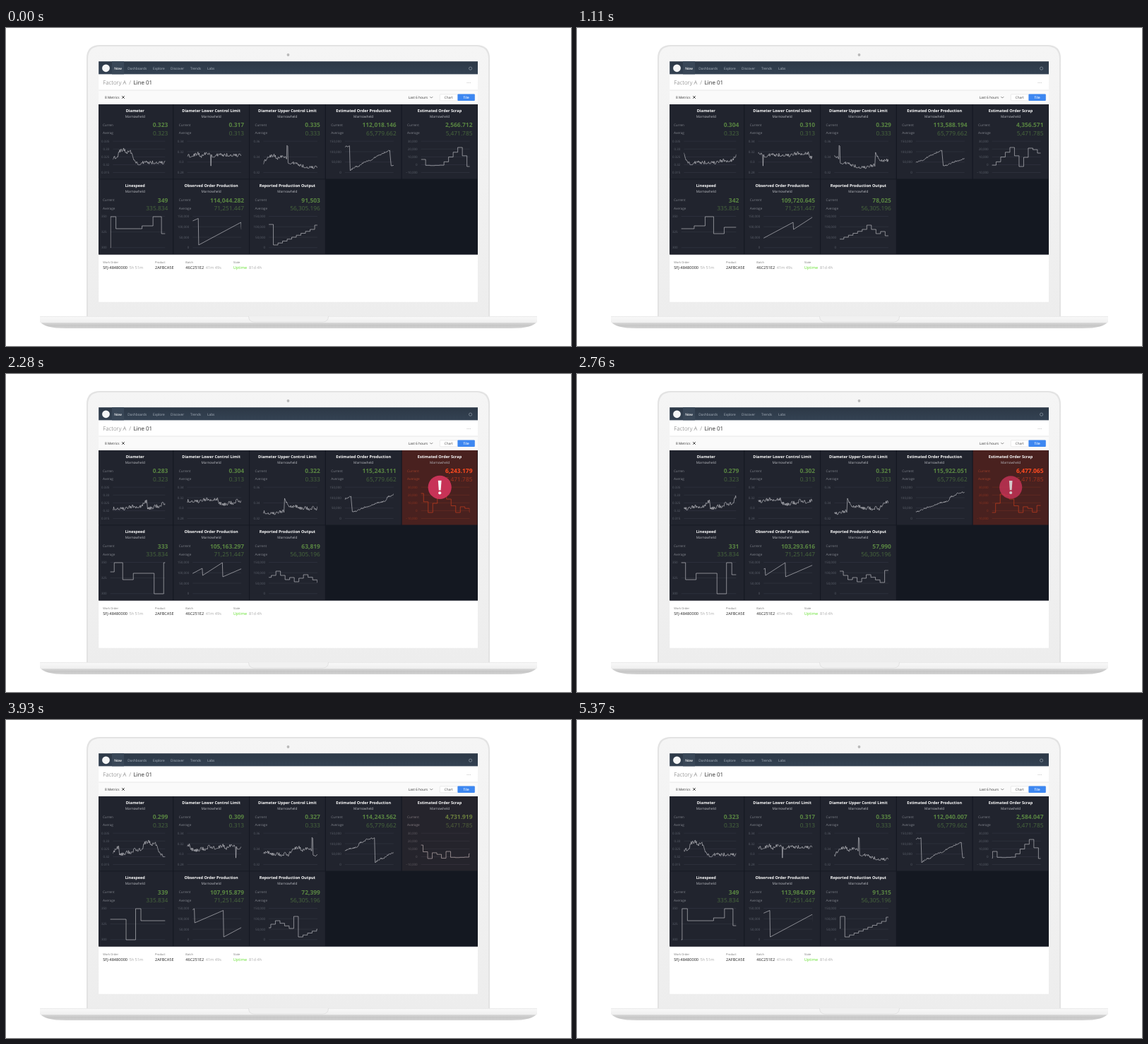
An HTML page for the animation above (5.4 s loop, 800 by 450 pixels).

```html
<!DOCTYPE html>
<html lang="en">
<head>
<meta charset="utf-8">
<title>Factory dashboard</title>
<style>
  html, body { margin: 0; width: 100%; height: 100%; overflow: hidden; background: #fff; }
  svg { display: block; }
  text { font-family: "Open Sans", "Noto Sans", sans-serif; text-rendering: geometricPrecision; }
  .tile { --a: 0%; }
  .tile * { --mix: color-mix(in srgb, var(--hot) var(--a), var(--cool)); }
  .bg { --cool: #21242e; --hot: #49211f; fill: var(--mix); }
  .title { font-size: 5.57px; font-weight: 700; fill: #fff; text-anchor: middle; }
  .sub { font-size: 4.8px; fill: #b9bbc1; text-anchor: middle; }
  .label { --cool: #80848c; --hot: #a0402a; font-size: 4.7px; fill: var(--mix); }
  .now { --cool: #598542; --hot: #ff4b20; font-size: 8.45px; font-weight: 700; fill: var(--mix); text-anchor: end; }
  .avg { --cool: #48683d; --hot: #a3351f; font-size: 8.4px; fill: var(--mix); text-anchor: end; }
  .tick { --cool: #5c616b; --hot: #8a3422; font-size: 4.5px; fill: var(--mix); text-anchor: end; }
  .grid { --cool: #343844; --hot: #6c2e23; stroke: var(--mix); stroke-width: .6; }
  .line { --cool: #d0d1d5; --hot: #d8421f; stroke: var(--mix); stroke-width: .6; fill: none; stroke-linejoin: round; }
  .nav { font-size: 4.8px; fill: #a9b2bd; }
  .crumb { font-size: 8px; fill: #666; font-weight: 300; }
  .head { font-size: 4px; fill: #777; }
  .info { font-size: 5.6px; fill: #222; }
  .dim { fill: #aaa; }
</style>
</head>
<body>
<svg width="800" height="450" viewBox="0 0 800 450">
  <defs>
    <linearGradient id="lid" x1="0" y1="0" x2="0" y2="1">
      <stop offset="0" stop-color="#f5f5f5"/><stop offset="1" stop-color="#ededed"/>
    </linearGradient>
    <linearGradient id="base" x1="0" y1="0" x2="0" y2="1">
      <stop offset="0" stop-color="#f9f9f9"/><stop offset="1" stop-color="#efefef"/>
    </linearGradient>
    <linearGradient id="under" x1="0" y1="0" x2="0" y2="1">
      <stop offset="0" stop-color="#e2e2e2"/><stop offset=".6" stop-color="#c6c6c6"/><stop offset="1" stop-color="#d4d4d4"/>
    </linearGradient>
    <linearGradient id="bar" x1="0" y1="0" x2="0" y2="1">
      <stop offset="0" stop-color="#2c3846"/><stop offset="1" stop-color="#344253"/>
    </linearGradient>
  </defs>

  <path d="M114 409V43Q114 24 133 24H666Q685 24 685 43V409Z" fill="#e3e3e3"/>
  <path d="M116 409V44Q116 26 134 26H665Q683 26 683 44V409Z" fill="url(#lid)"/>
  <circle cx="399.5" cy="38" r="1.9" fill="#b9b9b9"/>
  <path d="M48 415H752Q747 425 715 425H85Q53 425 48 415Z" fill="url(#under)"/>
  <rect x="48" y="408" width="704" height="9" rx="1" fill="url(#base)"/>
  <path d="M48 408.3H752" stroke="#e2e2e2" stroke-width=".7"/>
  <path d="M343.5 408Q344 416 351 416H449Q456 416 456.5 408" fill="#f1f1f1" stroke="#dedede" stroke-width=".8"/>

  <svg x="131.2" y="47.2" width="536.8" height="340.6" viewBox="131.2 47.2 536.8 340.6">
    <rect x="131" y="47" width="538" height="341" fill="#fff"/>
    <rect x="131" y="47" width="538" height="18.4" fill="url(#bar)"/>
    <rect x="150" y="47" width="17" height="18.4" fill="#394757"/>
    <circle cx="141.5" cy="56.8" r="5.4" fill="#f4f5f6"/>
    <g class="nav">
      <text x="153.3" y="58.8" fill="#fff" font-weight="600">Now</text>
      <text x="172.3" y="58.8">Dashboards</text>
      <text x="208" y="58.8">Explore</text>
      <text x="233" y="58.8">Discover</text>
      <text x="261" y="58.8">Trends</text>
      <text x="285" y="58.8">Labs</text>
    </g>
    <circle cx="657.6" cy="57.2" r="2.1" fill="none" stroke="#84909c" stroke-width=".8"/>

    <g class="crumb">
      <text x="137.2" y="79.6">Factory A</text>
      <text x="174.2" y="79.6">/</text>
      <text x="180.4" y="79.6" font-weight="400" fill="#333">Line 01</text>
    </g>
    <path d="M652.5 77.5H658" stroke="#c4c4c4" stroke-width=".9" stroke-dasharray="1.2 1"/>

    <rect x="131" y="88" width="538" height="20" fill="#fafafa"/>
    <path d="M131 88H669" stroke="#e2e2e2" stroke-width=".8"/>
    <text x="140" y="99.8" font-size="4.8" fill="#333">8 Metrics</text>
    <path d="M164.2 96.2l3.6 3.6m0-3.6l-3.6 3.6" stroke="#333" stroke-width=".9"/>
    <text x="569.7" y="99.8" font-size="4.8" fill="#333">Last 6 hours</text>
    <path d="M600.4 97.2l1.9 1.9 1.9-1.9" fill="none" stroke="#555" stroke-width=".7"/>
    <rect x="614.3" y="93.8" width="49.4" height="9" rx="1" fill="#fff" stroke="#ddd" stroke-width=".6"/>
    <rect x="639.4" y="93.6" width="24.4" height="9.4" rx="1" fill="#3d87f1"/>
    <text x="626.7" y="99.8" font-size="4.7" fill="#444" text-anchor="middle">Chart</text>
    <text x="651.6" y="99.8" font-size="4.7" fill="#fff" font-weight="600" text-anchor="middle">Tile</text>

    <rect x="131" y="108" width="538" height="212.7" fill="#141821"/>
    <g id="tiles"></g>
    <g id="alert">
      <circle r="16.6" fill="#cd345a"/>
      <path d="M-2.4-9.6H2.4L1.4 4.2H-1.4Z" fill="#fff"/>
      <circle cy="8" r="2.1" fill="#fff"/>
    </g>

    <g class="head">
      <text x="137.3" y="333">Work Order</text>
      <text x="211" y="333">Product</text>
      <text x="254.3" y="333">Batch</text>
      <text x="321.8" y="333">State</text>
    </g>
    <g class="info">
      <text x="137.2" y="340.8">SFJ-48480000</text><text x="174.5" y="340.8" class="dim">5h 51m</text>
      <text x="211" y="340.8">2AFBCA5E</text>
      <text x="254.3" y="340.8">46C251E2</text><text x="282.7" y="340.8" class="dim">41m 49s</text>
      <text x="321.8" y="340.8" style="fill:#62e02c">Uptime</text><text x="344" y="340.8" class="dim">81d 4h</text>
    </g>
  </svg>
</svg>

<script>
const LOOP = 5400, STEP = 30, LEAD = 17;
const SPAN = 130, STAIR = SPAN / 20, CELL = SPAN / 26, GRAIN = .8;
const NS = 'http://www.w3.org/2000/svg';

// range: value at the ends of the loop and at the turn; ticks: first, step, count
// keys: turning points of the scrolling series; noise, steps and stairs fill in the rest
const metrics = [
  { title: 'Diameter', dec: 3, avg: 0.323, ticks: [.335, -.005, 5],
    range: [.3235, .277], turn: 2650, noise: 5,
    keys: [[0, 184], [7, 180], [8, 174], [24, 174], [31, 190], [94, 188], [103, 181], [104, 190]] },
  { title: 'Diameter Lower Control Limit', dec: 3, avg: 0.313, ticks: [.34, -.02, 4],
    range: [.3168, .3014], turn: 2650, noise: 5,
    keys: [[0, 180], [33, 179], [33.5, 196], [34.2, 179], [98, 178], [100, 185]] },
  { title: 'Diameter Upper Control Limit', dec: 3, avg: 0.333, ticks: [.36, -.02, 3],
    range: [.3352, .32], turn: 2650, noise: 4.5,
    keys: [[0, 191], [6, 181], [33, 184], [33.4, 167], [34.5, 167], [35, 188], [61, 196], [84, 195], [85, 177], [92, 188]] },
  { title: 'Estimated Order Production', dec: 3, avg: 65779.662, ticks: [150000, -50000, 4],
    range: [111994.1, 115975.8], turn: 2798, noise: 2,
    keys: [[0, 168], [6.5, 166], [7.5, 201], [63.5, 172], [65.5, 195], [114, 178.5], [115, 174]] },
  { title: 'Estimated Order Scrap', dec: 3, avg: 5471.785, ticks: [30000, -10000, 5],
    range: [2539.3, 6736.6], turn: 2586, stairs: true,
    keys: [[0, 186], [7, 195], [28, 194], [53, 168], [65, 196], [79, 168], [91, 177], [104, 196], [112, 186], [124, 196]] },
  { title: 'Linespeed', dec: 0, avg: 335.834, ticks: [350, -25, 3],
    range: [349.6, 330.5], turn: 2650, steps: true,
    keys: [[0, 311], [.5, 267], [8, 284], [45, 280], [60.5, 267], [72.5, 291], [87.5, 282], [117, 311]] },
  { title: 'Observed Order Production', dec: 3, avg: 71251.447, ticks: [150000, -50000, 4],
    range: [114110.5, 103145.6], turn: 2798, noise: 0,
    keys: [[0, 273], [8, 269.5], [8.6, 307], [68.5, 275], [69.1, 285], [97, 267], [97.6, 287]] },
  { title: 'Reported Production Output', dec: 0, avg: 56305.196, ticks: [150000, -50000, 4],
    range: [91709, 57529], turn: 2798, stairs: true,
    keys: [[0, 278], [6.5, 307], [58.5, 285], [65, 279], [78, 291], [84.5, 288], [91, 294], [104, 284], [123.5, 295]] }
];

function add(parent, name, attrs, text) {
  const el = document.createElementNS(NS, name);
  for (const k in attrs) el.setAttribute(k, attrs[k]);
  if (text !== undefined) el.textContent = text;
  parent.append(el);
  return el;
}

// Linear interpolation through sorted [x, y] points, clamped at the ends
function lerp(pts, x) {
  const i = pts.findIndex(p => p[0] > x);
  if (i < 0) return pts[pts.length - 1][1];
  if (i === 0) return pts[0][1];
  const [a, b] = [pts[i - 1], pts[i]];
  return a[1] + (b[1] - a[1]) * (x - a[0]) / (b[0] - a[0]);
}

const format = (n, min, max = min) =>
  n.toLocaleString('en-US', { minimumFractionDigits: min, maximumFractionDigits: max }).replace('-', '\u2212');

function rand(i) {
  const s = Math.sin(i * 127.1 + 11.7) * 43758.5453;
  return s - Math.floor(s);
}

// Fine grain on top of a slower drift that repeats every SPAN
function wobble(x) {
  const cell = Math.floor(x / CELL), f = x / CELL - cell, cells = SPAN / CELL;
  const drift = rand(cell % cells) * (1 - f) + rand((cell + 1) % cells) * f;
  return drift + rand(Math.round(x / GRAIN) + 500) - 1;
}

const spread = gap => Array.from({ length: Math.round(SPAN / gap) }, (_, i) => i * gap);

function seriesPoints({ keys, noise, steps, stairs }) {
  if (steps) return keys;
  const loop = [...keys, [SPAN, keys[0][1]]];
  if (stairs) return spread(STAIR).map(x => [x, lerp(loop, x)]);
  if (!noise) return keys;
  const xs = [...keys.map(k => k[0]), ...spread(GRAIN)].sort((a, b) => a - b);
  return xs.map(x => [x, lerp(loop, x) + noise * wobble(x)]);
}

// Two periods, so that any window into the series is covered
function seriesPath(m) {
  const pts = seriesPoints(m), square = m.steps || m.stairs;
  return [...pts, ...pts.map(([x, y]) => [x + SPAN, y])].map(([x, y], i) => {
    if (!i) return `M${x} ${y}`;
    return square ? `H${x}V${y}` : `L${x} ${y}`;
  }).join('');
}

function buildTile(m, index) {
  const col = index % 5, row = Math.floor(index / 5);
  const x = 129.5 + 107.8 * col, dy = 106.3 * row, end = x + 95.8;
  const g = m.tile = add(tiles, 'g', { class: 'tile' });
  const put = (cls, tx, ty, s) => add(g, 'text', { class: cls, x: tx, y: ty + dy }, s);
  const trim = s => index ? s : s.slice(0, -1);

  add(g, 'rect', { class: 'bg', x, y: 108 + dy, width: 106.7, height: 105.5 });
  put('title', x + 53.3, 119, m.title);
  put('sub', x + 53.3, 126.8, 'Marnowheld');
  put('label', x + 7.4, 138.7, trim('Current'));
  put('label', x + 7.4, 150.3, trim('Average'));
  m.now = put('now', x + 99.8, 140.4, '');
  put('avg', x + 99.8, 151.9, format(m.avg, 3));

  const [first, gap, count] = m.ticks;
  const rows = Array.from({ length: count }, (_, i) => 160.2 + 44.3 * i / (count - 1));
  const labels = rows.map((y, i) => put('tick', 0, y + 1.6, format(first + gap * i, 0, 3)));
  const left = x + 10.4 + Math.max(...labels.map(l => l.getComputedTextLength()));
  labels.forEach(l => l.setAttribute('x', left - 5));
  rows.forEach(y => add(g, 'path', { class: 'grid', d: `M${left} ${y + dy}H${end}` }));

  const top = 155 + dy, w = end - left;
  const view = add(g, 'svg', { x: left, y: top, width: w, height: 55, viewBox: `0 ${top} ${w} 55` });
  m.line = add(view, 'path', { class: 'line', d: seriesPath(m) });
}

const tiles = document.getElementById('tiles');
const alertIcon = document.getElementById('alert');
metrics.forEach(buildTile);
const scrap = metrics.find(m => m.title.endsWith('Scrap'));

function draw(t) {
  for (const { range: [rest, peak], turn, dec, now, line } of metrics) {
    now.textContent = format(lerp([[-LEAD, rest], [turn, peak], [LOOP, rest]], t), dec);
    line.setAttribute('transform', `translate(${-SPAN * t / LOOP} 0)`);
  }
  const heat = lerp([[1500, 0], [1800, 1], [3690, 1], [3960, 0]], t);
  const show = lerp([[1500, 0], [1770, .96], [2570, .96], [3500, 0]], t);
  const size = lerp([[1500, .7], [1770, 1], [2570, 1], [3500, .85]], t);
  scrap.tile.style.setProperty('--a', heat * 100 + '%');
  alertIcon.setAttribute('transform', `translate(614.2 160.3) scale(${size})`);
  alertIcon.setAttribute('opacity', show);
}

const start = performance.now();
function tick() {
  const t = (performance.now() - start) % LOOP;
  draw(Math.floor(t / STEP) * STEP);
  requestAnimationFrame(tick);
}
draw(0);
requestAnimationFrame(tick);
</script>
</body>
</html>
```
